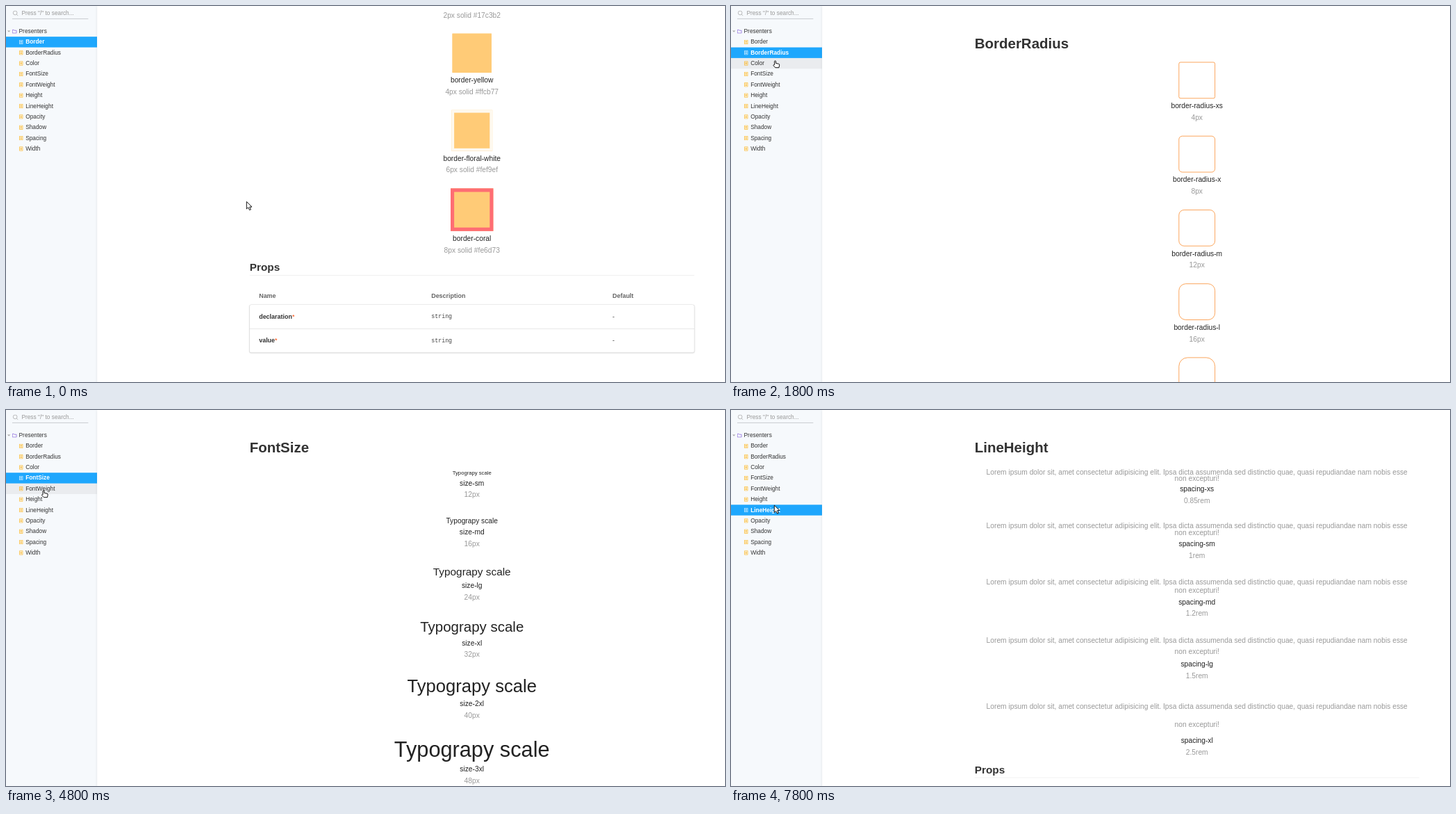
An HTML page for the animation above (8 s loop, 1035 by 541 pixels).

```html
<!DOCTYPE html>
<html lang="en">
<head>
<meta charset="utf-8">
<title>Design token presenters</title>
<style>
  html, body { margin: 0; width: 100%; height: 100%; overflow: hidden; background: #fff; }
  #stage { position: relative; width: 1035px; height: 541px; overflow: hidden; }
  #ui {
    position: absolute; width: 1618px; height: 846px; transform: scale(.64); transform-origin: 0 0;
    font: 16px "Liberation Sans", Arial, sans-serif; color: #222; background: #f6f9fc;
  }
  #ui svg { position: absolute; fill: none; }

  #sidebar { font-size: 13px; color: #333; }
  #search { position: absolute; left: 14px; top: 3px; width: 171px; height: 25px; border-bottom: 1px solid #aeb3b8; line-height: 25px; text-indent: 21px; color: #999; }
  #group { position: absolute; left: 29px; top: 45px; line-height: 24px; }
  #rows { position: absolute; top: 69px; width: 205px; }
  .row { position: relative; height: 24px; line-height: 23px; padding-left: 44px; color: #333; }
  .row svg { left: 29px; top: 6.5px; stroke: #ffae00; }
  .row.hover { background: rgba(0, 0, 0, .05); }
  .row.selected { background: #1ea7fd; color: #fff; font-weight: bold; }
  .row.selected svg { stroke: #fff; }

  #main { position: absolute; left: 205px; top: 0; width: 1500px; height: 846px; overflow: hidden; background: #fff; box-shadow: 0 1px 5px rgba(0, 0, 0, .1); }
  .page { position: absolute; left: 343px; top: 0; width: 1000px; padding-top: 64px; }
  h1 { margin: 0 0 22px; font-size: 32px; line-height: 40px; color: #333; }
  .intro { margin: 0; height: 48px; font-size: 14px; line-height: 10px; color: #333; }
  .item { padding-bottom: 28px; text-align: center; }
  .swatch { margin: 0 auto; width: 80px; height: 80px; }
  .sample { padding-top: 8px; line-height: normal; }
  .lorem { display: flex; justify-content: center; padding-top: 7.8px; white-space: nowrap; color: #999; }
  .label, .value { line-height: 26px; }
  .label { margin-top: 4px; }
  .value { color: #999; }

  h2 { margin: -18px 0 0; height: 33px; font-size: 24px; line-height: 32px; color: #333; border-bottom: 1px solid rgba(0, 0, 0, .12); }
  .cells { display: grid; grid-template-columns: 387.5px 407.5px 1fr; padding-left: 21px; font-size: 14px; line-height: 53px; color: #333; }
  .head { padding-top: 36px; height: 30px; line-height: 20px; font-weight: bold; color: #666; }
  .table { border-radius: 4px; box-shadow: 0 1px 3px 1px rgba(0, 0, 0, .1), 0 0 0 1px rgba(0, 0, 0, .1); }
  .table .cells + .cells { border-top: 1px solid rgba(0, 0, 0, .12); }
  .table i { font-style: normal; font-weight: normal; color: #ff4400; }
  code { font: 13px/53px "Liberation Mono", monospace; color: #444; }

  .cursor { position: absolute; left: 0; top: 0; overflow: visible; fill: #fff; stroke: #111; stroke-linejoin: round; }
</style>
</head>
<body>
<div id="stage">
  <div id="ui">
    <div id="sidebar">
      <div id="search">Press "/" to search...</div>
      <svg style="left:15px;top:10px" width="13" height="13" stroke="#999"><circle cx="5.5" cy="5.5" r="4.5"/><path d="M9 9l3 3"/></svg>
      <svg style="left:3px;top:55px" width="8" height="5"><path d="M0 0h7L3.5 4Z" fill="#aaa"/></svg>
      <svg style="left:14px;top:52px" width="11" height="10" stroke="#774cd7"><path d="M.5 1.5h3l1 1.5h5v6h-9Z"/></svg>
      <div id="group">Presenters</div>
      <div id="rows"></div>
    </div>
    <div id="main"></div>
  </div>
  <svg id="arrow" class="cursor" width="10" height="14"><path d="M.3.5V11L2.7 8.8 4.6 12.6 6.4 11.8 4.7 8.1H8Z"/></svg>
  <svg id="hand" class="cursor" width="12" height="13"><path d="M2.6 6.6V1.8a1 1 0 0 1 2 0V4.5L8.5 5.2q1.5.3 1.2 1.9L9 10.7H4L.8 7.5Q1.2 6.2 2.6 6.6Z"/></svg>
</div>

<script>
const byId = id => document.getElementById(id);
const SCALE = 0.64, ROW_TOP = 69, ROW_HEIGHT = 24, SIDEBAR_EDGE = 131, LOOP = 8000;
const names = ['Border', 'BorderRadius', 'Color', 'FontSize', 'FontWeight', 'Height',
  'LineHeight', 'Opacity', 'Shadow', 'Spacing', 'Width'];
const palette = [['blue', '#227c9d'], ['sea', '#17c3b2'], ['yellow', '#ffcb77'],
  ['floral-white', '#fef9ef'], ['coral', '#fe6d73']];
const outline = 'border:1px solid #f97300;';
const lorem = 'Lorem ipsum dolor sit, amet consectetur adipisicing elit. Ipsa dicta assumenda sed ' +
  'distinctio quae, quasi repudiandae nam nobis esse<br>non excepturi!';

const item = (shape, label, value) =>
  `<div class="item">${shape}<div class="label">${label}</div><div class="value">${value}</div></div>`;
const swatch = style => `<div class="swatch" style="${style}"></div>`;
const sample = (style, text, kind = '') => `<div class="sample ${kind}" style="${style}"><span>${text}</span></div>`;
const loremSample = style => sample(style, lorem, 'lorem');
const list = (entries, render) => entries.map(render).join('');

const propRow = name =>
  `<div class="cells"><span><b>${name}</b><i>*</i></span><code>string</code><span>-</span></div>`;
const props = `<h2>Props</h2>
  <div class="cells head"><span>Name</span><span>Description</span><span>Default</span></div>
  <div class="table">${propRow('declaration')}${propRow('value')}</div>`;

const contents = [
  list(palette, ([name, color], i) => {
    const width = i ? 2 * i : 1;
    return item(swatch(`background:#ffcb77;border:${width}px solid ${color}`),
      'border-' + name, `${width}px solid ${color}`);
  }),
  list(['xs', 'x', 'm', 'l', 'xl'], (size, i) => {
    const radius = 4 * (i + 1) + 'px';
    return item(swatch(outline + 'border-radius:' + radius), 'border-radius-' + size, radius);
  }),
  '<p class="intro">Convey meaning through color.</p>' + list(palette, ([name, color]) =>
    item(swatch(`width:50px;height:50px;border-radius:50%;background:${color}`), name, color)),
  list([['sm', 12], ['md', 16], ['lg', 24], ['xl', 32], ['2xl', 40], ['3xl', 48]], ([size, px]) =>
    item(sample(`font-size:${px}px`, 'Typograpy scale'), 'size-' + size, px + 'px')),
  list([['light', 300], ['regular', 400], ['medium', 500], ['bold', 700], ['black', 900]], ([name, weight]) =>
    item(loremSample('font-weight:' + weight), 'weight-' + name, weight)),
  list([['3xs', 2], ['2xs', 4], ['xs', 8], ['sm', 12], ['md', 16], ['lg', 24], ['xl', 32], ['2xl', 40]], ([size, px]) =>
    item(swatch(`${outline}background:#ffcb77;height:${px}px`), 'height-' + size, px + 'px')),
  list([['xs', .85], ['sm', 1], ['md', 1.2], ['lg', 1.5], ['xl', 2.5]], ([size, rem]) =>
    item(loremSample(`line-height:${rem}rem`), 'spacing-' + size, rem + 'rem')),
];

byId('rows').innerHTML = list(names, name => `<div class="row">
  <svg width="10" height="10"><path d="M1.5.5h7v9h-7ZM3 3h4M3 5h4M3 7h4"/></svg>${name}</div>`);
byId('main').innerHTML = list(contents, (content, i) =>
  `<div class="page"><h1>${names[i]}</h1>${content}${props}</div>`);
const rows = [...document.querySelectorAll('.row')];
const pages = [...document.querySelectorAll('.page')];

// Each step changes only the listed properties of the screen.
const steps = [
  { t: 0, page: 0, scroll: 398, at: [346, 281] },
  { t: 100, scroll: 270 }, { t: 250, scroll: 90 }, { t: 400, scroll: 0 },
  { t: 700, at: [300, 240] }, { t: 750, at: [210, 160] }, { t: 800, at: [90, 80] },
  { t: 850, at: [56, 62] }, { t: 950, page: 1 }, { t: 1050, at: [75, 70] },
  { t: 1100, at: [160, 110] }, { t: 1200, at: [270, 172] }, { t: 1250, at: [313, 194] },
  { t: 1650, at: [200, 130] }, { t: 1800, at: [60, 78] }, { t: 1950, page: 2 },
  { t: 2100, at: [190, 150] }, { t: 2250, at: [347, 241] },
  { t: 2450, scroll: 25 }, { t: 2650, scroll: 64 }, { t: 2850, scroll: 200 }, { t: 3050, scroll: 275 },
  { t: 3450, at: [250, 190] }, { t: 3600, at: [110, 115] }, { t: 3750, at: [62, 95] },
  { t: 3900, page: 3, scroll: 0 }, { t: 4150, at: [60, 97] },
  { t: 4500, at: [56, 109] }, { t: 4650, at: [52, 112] }, { t: 4800, at: [50.5, 115] },
  { t: 5000, page: 4 }, { t: 5500, at: [48, 125] }, { t: 5650, page: 5 },
  { t: 5850, at: [47, 130] }, { t: 6400, at: [255, 196] },
  { t: 6950, scroll: 64 }, { t: 7100, at: [190, 170] }, { t: 7250, at: [90, 145] },
  { t: 7400, at: [60, 137] }, { t: 7600, page: 6, scroll: 0 }, { t: 7800, at: [62, 136.5], arrow: true },
];

function render(time) {
  const { page, scroll, at: [x, y], arrow } =
    Object.assign({}, ...steps.filter(step => step.t <= time));
  const inSidebar = x < SIDEBAR_EDGE;
  const hovered = inSidebar ? Math.floor(((y + 1) / SCALE - ROW_TOP) / ROW_HEIGHT) : -1;
  rows.forEach((row, i) => {
    row.classList.toggle('selected', i === page);
    row.classList.toggle('hover', i === hovered && i !== page);
  });
  pages.forEach((el, i) => {
    el.style.display = i === page ? 'block' : 'none';
    el.style.transform = `translateY(${-scroll}px)`;
  });
  const useHand = inSidebar && !arrow;
  for (const [id, shown] of [['hand', useHand], ['arrow', !useHand]]) {
    byId(id).style.display = shown ? 'block' : 'none';
    byId(id).style.transform = `translate(${x}px, ${y}px)`;
  }
}

const start = performance.now();
function tick() {
  render((performance.now() - start) % LOOP);
  requestAnimationFrame(tick);
}
tick();
</script>
</body>
</html>
```
